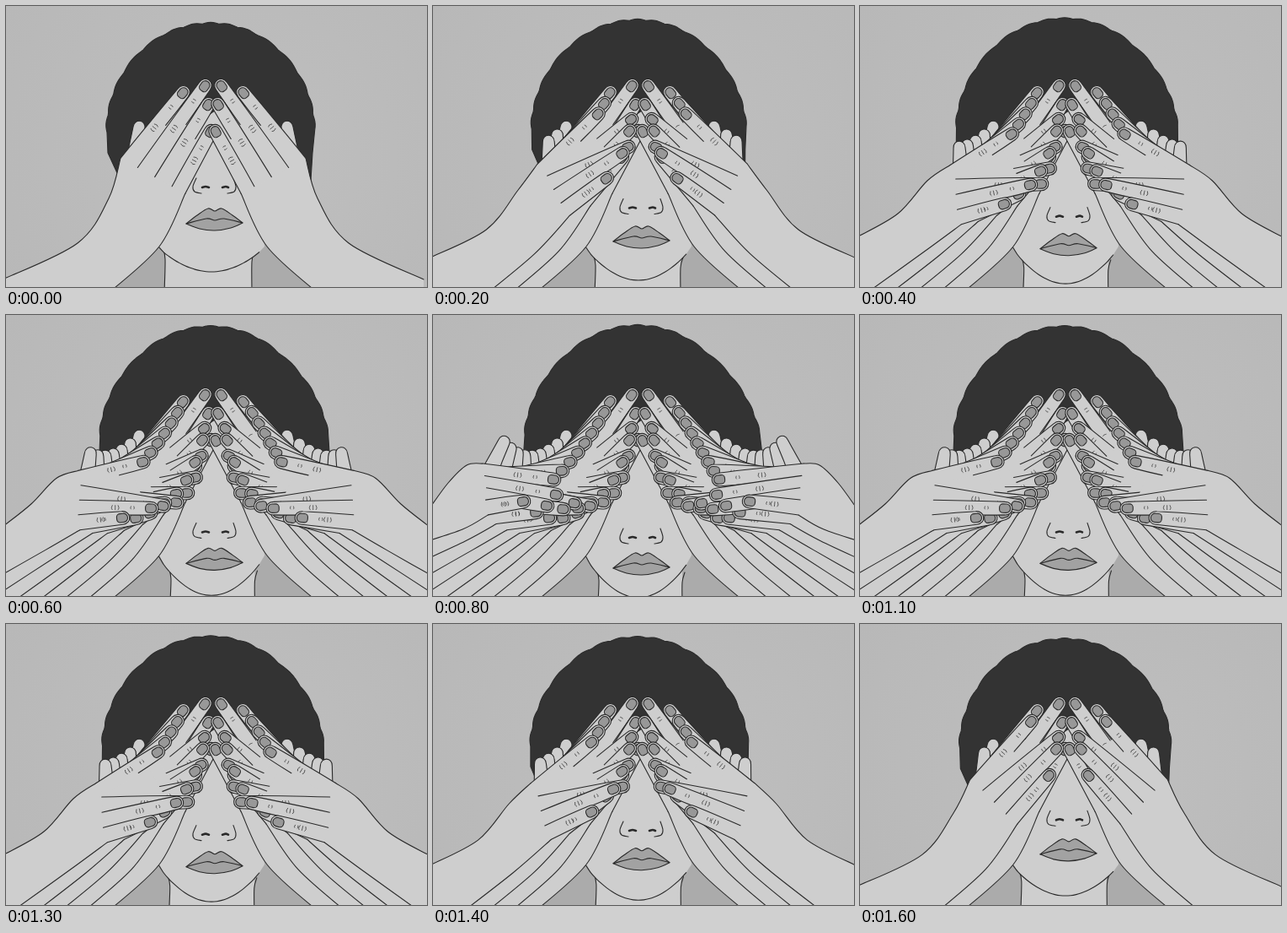
An HTML page with a canvas for the animation above (1700 ms loop, 500x333 px).

```html
<!DOCTYPE html>
<html lang="en">
<head>
<meta charset="utf-8">
<title>Covered eyes</title>
<style>
html, body { margin: 0; width: 100%; height: 100%; overflow: hidden; background: #bababa; }
canvas { display: block; width: 500px; height: 333px; }
</style>
</head>
<body>
<canvas id="stage" width="500" height="333"></canvas>
<script>
const ctx = document.getElementById('stage').getContext('2d');
const INK = '#2a2a2a', SKIN = '#cecece', NAIL = '#989898', LIPS = '#a2a2a2';
const HAIR = '#333', SHIRT = '#ababab';
const STEP = 100, LOOP = 1700, LAST = 8;

// Each point of the left hand travels along a parabola through
// its places in the first, middle and last hand of the stack.
const TIPS = [
  [[210, 103], [180, 152], [143, 195]],
  [[236, 95], [215, 211], [146, 213]],
  [[240, 117], [202, 212], [135, 226]],
  [[243, 149], [171, 235], [107, 221]]
];
const INDEX_BASE = [[143, 186], [112, 196], [58, 185]];
const LITTLE_BASE = [[205, 218], [118, 250], [64, 228]];
const THUMB = [[158, 144], [118, 168], [84, 151]];
const OUTER = [
  [[-4, 324], [-4, 274], [-4, 229]],
  [[85, 281], [45, 246], [18, 199]],
  [[122, 228], [80, 207], [40, 178]]
];
const INNER = [
  [[182, 285], [75, 292], [35, 254]],
  [[122, 340], [8, 340], [-20, 272]]
];

const mix = (a, b, f) => [a[0] + (b[0] - a[0]) * f, a[1] + (b[1] - a[1]) * f];

function travel([a, b, c], k) {
  const t = k / (LAST / 2);
  return [0, 1].map(i =>
    a[i] * (1 - t) * (2 - t) / 2 + b[i] * t * (2 - t) + c[i] * t * (t - 1) / 2);
}

// Smooth curve through points; continues the current path when join is set
function curve(pts, join) {
  if (join) ctx.lineTo(...pts[0]); else ctx.moveTo(...pts[0]);
  for (let i = 0; i < pts.length - 1; i++) {
    const a = pts[Math.max(0, i - 1)], b = pts[i], c = pts[i + 1];
    const d = pts[Math.min(pts.length - 1, i + 2)];
    ctx.bezierCurveTo(b[0] + (c[0] - a[0]) / 6, b[1] + (c[1] - a[1]) / 6,
      c[0] - (d[0] - b[0]) / 6, c[1] - (d[1] - b[1]) / 6, c[0], c[1]);
  }
}

function line(...pts) {
  ctx.beginPath();
  curve(pts);
  ctx.stroke();
}

function fill(color, pts) {
  ctx.beginPath();
  for (const p of pts) ctx.lineTo(...p);
  ctx.fillStyle = color;
  ctx.fill();
}

// Point beside a finger base, w to the outer side
function beside(base, tip, w) {
  const a = Math.atan2(tip[1] - base[1], tip[0] - base[0]);
  return [base[0] + Math.sin(a) * w, base[1] - Math.cos(a) * w];
}

function knuckle(x, h, n) {
  ctx.lineWidth = 0.7;
  for (let i = 0; i < n; i++) {
    const off = i - (n - 1) / 2;
    line([x + off * 3.4, -h], [x + off * 4.4, 0], [x + off * 3.4, h - 1]);
  }
  ctx.lineWidth = 1.1;
}

// inner: where along the finger its inner edge line stops
function finger(base, tip, w0, w1, inner, nail) {
  const dx = tip[0] - base[0], dy = tip[1] - base[1], len = Math.hypot(dx, dy);
  const end = len + w1 * 1.5, stop = len * inner;
  const trace = (x, w) => {
    ctx.beginPath();
    ctx.moveTo(0, -w0);
    ctx.quadraticCurveTo(len * 0.6, -w1 - 1, len, -w1);
    ctx.bezierCurveTo(end, -w1, end, w1, len, w1);
    ctx.quadraticCurveTo((len + x) / 2, w1 + 0.6, x, w);
  };
  ctx.save();
  ctx.translate(...base);
  ctx.rotate(Math.atan2(dy, dx));
  trace(0, w0);
  ctx.fillStyle = SKIN;
  ctx.fill();
  trace(stop, w0 + (w1 - w0) * inner);
  ctx.stroke();
  if (nail) {
    ctx.beginPath();
    ctx.roundRect(len - 6.5, -5.2, 13, 10.4, [4, 5, 5, 4]);
    ctx.fillStyle = NAIL;
    ctx.fill();
    ctx.stroke();
    knuckle(len - 22, 2, 2);
    knuckle(len * 0.5, 3, 3);
  }
  ctx.restore();
}

function hand(k, reach) {
  const place = path => travel(path, k);
  const tips = TIPS.map(place).map(([x, y]) => [x + reach, y]);
  const first = place(INDEX_BASE), last = place(LITTLE_BASE);
  const bases = tips.map((_, i) => mix(first, last, i / 3));
  finger([first[0] + 8, first[1] + 4], place(THUMB), 10, 7, 0, false);

  const outer = [...OUTER.map(place), beside(first, tips[0], 9)];
  const inner = [beside(last, tips[3], -9), ...INNER.map(place)];
  ctx.beginPath();
  curve(outer);
  tips.forEach((t, i) => ctx.lineTo(...mix(bases[i], t, 0.78)));
  curve(inner, true);
  ctx.lineTo(-4, inner[2][1]);
  ctx.fillStyle = SKIN;
  ctx.fill();
  line(...outer);
  line(...inner);
  bases.forEach((b, i) => finger(b, tips[i], 9, 7.8, i < 3 ? 0.6 : 0, true));
}

function hands(k) {
  hand(k, 0);
  ctx.save();
  ctx.translate(500 - 8 / (k + 1), 0);
  ctx.scale(-1, 1);
  hand(k, k * k / 4);
  ctx.restore();
}

// Scalloped half ellipse that flares towards the bottom
function hair(k, rise) {
  const pts = [], lift = 8 * rise;
  const flare = (x, y) =>
    [x + (x < 243 ? -1.5 : 3) * k * Math.max(0, y - 50) / 110, y - lift];
  pts.push(flare(133, 200), flare(121, 174));
  for (let a = 0; a <= Math.PI; a += Math.PI / 120) {
    const bump = 1.6 * Math.abs(Math.sin(a * 15 + Math.sin(a * 4))) - 1;
    pts.push(flare(243 - (124 + bump) * Math.cos(a), 150 - (130 + bump) * Math.sin(a)));
  }
  pts.push(flare(364, 174), flare(362, 206));
  fill(HAIR, pts);
  ctx.stroke();
}

function nose(y) {
  ctx.save();
  ctx.translate(247, y);
  line([-21, -10], [-25, 0], [-23, 6], [-15, 8]);
  line([23, -10], [26, 0], [24, 6], [16, 8]);
  ctx.lineWidth = 2.6;
  line([-14, 1], [-10, 0], [-6, 1]);
  line([10, 1], [14, 0], [17, 1]);
  ctx.restore();
}

function mouth(y) {
  const left = [-33, 5], right = [34, 4];
  ctx.save();
  ctx.translate(247, y);
  ctx.beginPath();
  curve([left, [-20, -5], [-7, -13], [1, -10], [9, -13], [22, -5], right]);
  curve([right, [20, 10], [1, 13], [-17, 11], left], true);
  ctx.fillStyle = LIPS;
  ctx.fill();
  ctx.stroke();
  line(left, [-9, -1], [1, 1], [12, -1], right);
  ctx.restore();
}

function face(rise) {
  fill(SHIRT, [[115, 340], [170, 275], [315, 275], [372, 340]]);
  const l = 189 + 8 * rise, r = 292 + 4 * rise, top = 295 + 14 * rise;
  fill(SKIN, [[l, 285], [r, 285], [r, 340], [l, 340]]);
  line([l - 3, top - 8], [l, top + 5], [l - 1, 340]);
  line([r + 3, top - 4], [r, top + 8], [r, 340]);

  const jaw = [];
  for (let u = 0; u <= 1; u += 0.05) {
    const sag = Math.sin(Math.PI * u) ** 0.8;
    jaw.push([181 + 126 * u, 285 + (30 + 20 * rise) * sag]);
  }
  fill(SKIN, [...jaw, [307, 285], [300, 200], [282, 145], [249, 124], [218, 145], [190, 200]]);
  line(...jaw);
  nose(214 + 49 * rise);
  mouth(253 + 42 * rise);
}

const back = ctx.createRadialGradient(290, 190, 40, 270, 170, 320);
back.addColorStop(0, '#bebebe');
back.addColorStop(1, '#b8b8b8');

function draw(pose) {
  const rise = Math.sqrt(pose / LAST);
  ctx.lineWidth = 1.1;
  ctx.lineJoin = ctx.lineCap = 'round';
  ctx.strokeStyle = INK;
  ctx.fillStyle = back;
  ctx.fillRect(0, 0, 500, 333);
  hair(pose, rise);
  face(rise);
  for (let k = 0; k <= pose; k++) hands(k);
}

const start = performance.now();
let shown = -1;
function tick() {
  const step = Math.floor(((performance.now() - start) % LOOP) / STEP);
  const pose = Math.min(LAST, step, LOOP / STEP - step);
  if (pose !== shown) draw(shown = pose);
  requestAnimationFrame(tick);
}
tick();
</script>
</body>
</html>
```
